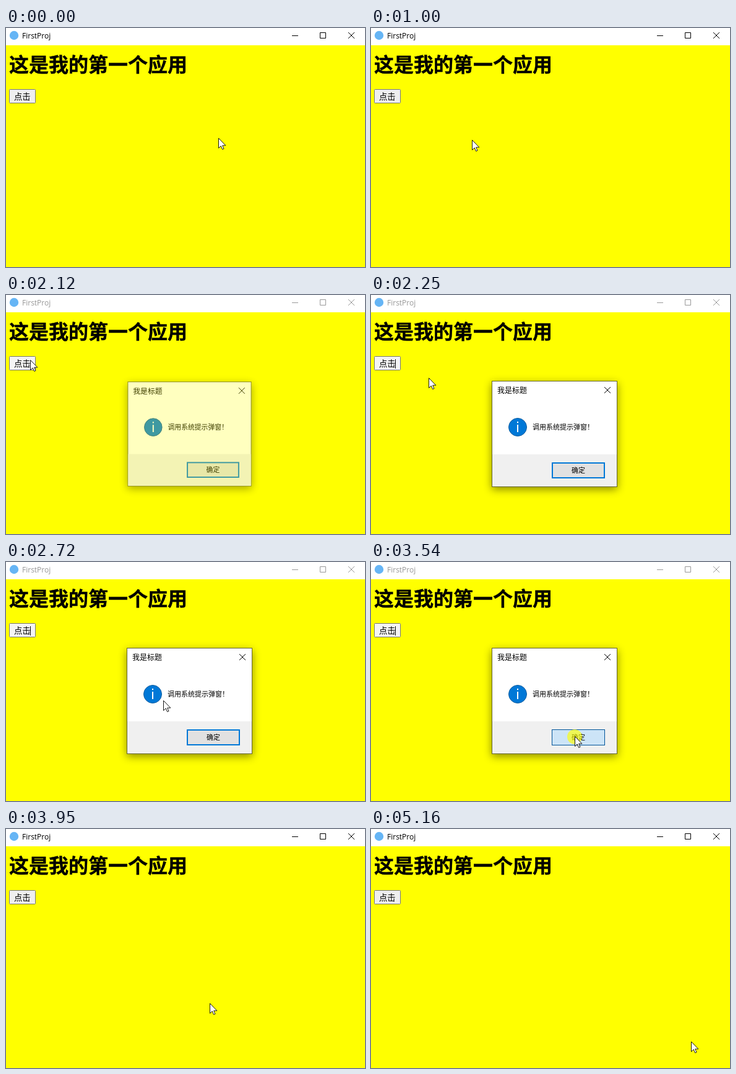
Animation of 580 by 387 pixels, one loop 5770 ms. Source, as an HTML page:

```html
<!DOCTYPE html>
<html lang="zh-CN">
<head>
<meta charset="utf-8">
<title>FirstProj</title>
<style>
  html, body { margin: 0; width: 100%; height: 100%; overflow: hidden; background: #ff0; }
  svg { display: block; width: 580px; height: 387px; }
  text { font-family: "Noto Sans CJK SC", "Noto Sans CJK", sans-serif; white-space: pre; }
  .caption { font: 12px "Open Sans", "Noto Sans", sans-serif; }
  .heading { font-size: 32px; font-weight: 700; stroke: #000; stroke-width: .4px; }
  .small { font-size: 11px; }
  .line { fill: none; stroke: currentColor; }
  #dialog { transform-origin: 296.5px 225px; }
  #panel { filter: drop-shadow(0 4px 7px rgba(0, 0, 0, .45)); }
</style>
</head>
<body>
<svg viewBox="0 0 580 387">
  <rect width="580" height="387" fill="#ff0"/>
  <rect width="580" height="28" fill="#fff"/>
  <circle cx="13" cy="12" r="7.2" fill="#66b5f5"/>
  <g id="bar" fill="currentColor">
    <text class="caption" x="26" y="17">FirstProj</text>
    <path class="line" d="M462 12.5h10M507.5 7.5h9v9h-9zM553 7l10 10M563 7l-10 10"/>
  </g>

  <text class="heading" x="5" y="71">这是我的第一个应用</text>

  <rect id="button" x="5.5" y="99.5" width="42" height="22" rx="1"/>
  <text x="13" y="116" font-size="13.33">点击</text>
  <path id="caret" class="line" d="M39.5 104v15"/>

  <g id="dialog">
    <rect id="panel" x="195.5" y="139.5" width="202" height="171" fill="#fff" stroke="#66662a"/>
    <rect x="196" y="258" width="201" height="52" fill="#f0f0f0"/>
    <text x="204" y="159" font-size="12">我是标题</text>
    <path class="line" d="M377 149l10 10M387 149l-10 10"/>
    <circle cx="237" cy="214" r="14.5" fill="#0078d7" stroke="#0b5c9e"/>
    <path d="M236 210h2v12h-2zM236 205h2v2.2h-2z" fill="#fff"/>
    <text class="small" x="261" y="218">调用系统提示弹窗！</text>
    <rect x="293" y="272" width="84" height="24" fill="#e1e1e1" stroke="#0078d7" stroke-width="2"/>
    <rect id="hover" x="292.5" y="271.5" width="85" height="25" fill="#e5f1fb" stroke="#0078d7"/>
    <rect id="press" x="292.5" y="271.5" width="85" height="25" fill="#cce4f7" stroke="#005499"/>
    <text class="small" x="324" y="288">确定</text>
  </g>

  <g id="cursor">
    <circle id="halo" cy="1" r="12" fill="#ff0" opacity=".65"/>
    <path d="M.5 .5V16.5L4.2 13L6.6 18.5L9 17.5L6.7 12.2H11.8Z" fill="#fff" stroke="#000" stroke-width=".9"/>
  </g>
</svg>
<script>
const LOOP = 5770, STEP = 68;
const el = id => document.getElementById(id);
const [bar, button, caret, dialog, hover, press, cursor, halo] =
  ['bar', 'button', 'caret', 'dialog', 'hover', 'press', 'cursor', 'halo'].map(el);

// Pointer moves: each curves from the last rest point, via a bend, to a new one.
const home = [343, 178];
const moves = [
  { from: 60, until: 130, to: [322, 179] },
  { from: 390, until: 660, to: [231, 173], via: [285, 192] },
  { from: 860, until: 1420, to: [60, 123], via: [120, 203] },
  { from: 1490, until: 1650, to: [39, 105] },
  { from: 2180, until: 2570, to: [228, 206] },
  { from: 2650, until: 3200, to: [329, 282], via: [290, 246] },
  { from: 4150, until: 4210, to: [385, 310] },
  { from: 4480, until: 5020, to: [517, 347], via: [500, 375] },
  { from: 5090, until: 5160, to: [517, 344] }
];

function stepped(t, from, until) {
  if (t < from) return 0;
  const gaps = Math.round((until - from) / STEP);
  const done = Math.floor((t - from) / (until - from) * gaps + .05) + 1;
  return Math.min(1, done / (gaps + 1));
}

const lerp = (a, b, u) => a.map((v, k) => v + (b[k] - v) * u);
const curve = (a, b, c, u) => lerp(lerp(a, b, u), lerp(b, c, u), u);

function pointerAt(t) {
  let pos = home;
  for (const { from, until, to, via } of moves) {
    if (t < from) break;
    const u = stepped(t, from, until);
    pos = via ? curve(pos, via, to, u) : lerp(pos, to, u);
  }
  return pos.map(Math.round);
}

const between = (t, a, b) => t >= a && t < b;
const show = (node, on) => node.setAttribute('visibility', on ? 'visible' : 'hidden');

function draw(t) {
  cursor.setAttribute('transform', `translate(${pointerAt(t)})`);
  show(halo, between(t, 1830, 1900) || between(t, 3330, 3740));
  bar.style.color = between(t, 1900, 3740) ? '#999' : '#000';

  const over = between(t, 1650, 1830), held = between(t, 1830, 3740);
  button.setAttribute('fill', held ? '#f5f5f5' : over ? '#e5e5e5' : '#efefef');
  button.setAttribute('stroke', over ? '#4f4f4f' : '#767676');
  show(caret, between(t, 2180, 3740));

  const opened = 1 - (1 - stepped(t, 2050, 2250)) ** 2;
  const shown = opened * (1 - stepped(t, 3740, 3950));
  dialog.style.opacity = shown;
  dialog.style.transform = `scale(${.945 + .055 * shown})`;
  hover.style.opacity = stepped(t, 3060, 3200);
  press.style.opacity = stepped(t, 3330, 3540);
}

const began = performance.now();
function tick() {
  draw((performance.now() - began) % LOOP);
  requestAnimationFrame(tick);
}
tick();
</script>
</body>
</html>
```
